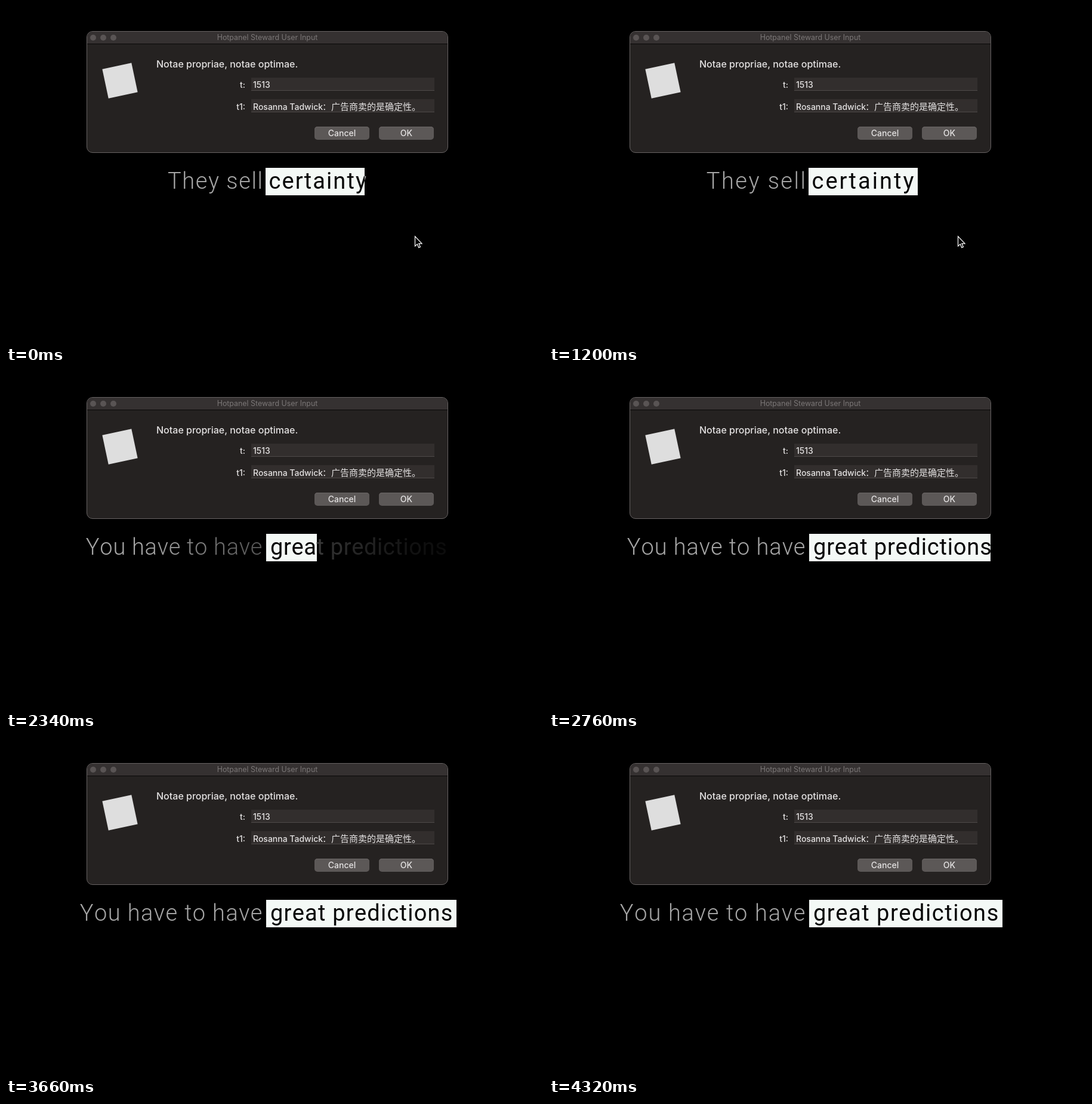
Recreate the animation shown at these times as an HTML page. Size 900 by 566 pixels, loop 4380 ms.

```html
<!DOCTYPE html>
<html lang="en">
<head>
<meta charset="utf-8">
<title>Caption over dialog</title>
<style>
  html, body { margin: 0; width: 100%; height: 100%; overflow: hidden; background: #000; }
  #stage { position: relative; width: 900px; height: 566px; overflow: hidden; background: #000; }
  #stage div { position: absolute; white-space: pre; }
  #dialog {
    left: 135px; top: 42px; width: 604px; height: 202px; overflow: hidden;
    border: 1px solid #676363; border-radius: 10px; background: #252221;
    font: 500 14px/20px Inter, "Noto Sans", sans-serif; color: #e4e2e2;
  }
  #bar {
    left: 0; top: 0; width: 100%; height: 20px; background: #353131;
    border-bottom: 1px solid #080707;
    font-size: 12.4px; font-weight: 400; line-height: 19px; text-align: center; color: #7b7777;
  }
  .dot { width: 10px; height: 10px; top: 5px; border-radius: 50%; background: #595454; }
  #mark { left: 30px; top: 57px; width: 50px; height: 50px; background: #dedede; transform: rotate(-12deg); }
  .field { left: 275px; width: 307px; height: 21px; background: #322e2d; border-bottom: 1px solid #4d4948; }
  .label { width: 60px; left: 205px; text-align: right; }
  .button {
    top: 159px; width: 92px; height: 22px; border-radius: 5px; background: #5c5857;
    box-shadow: inset 0 1px #6b6766; line-height: 22px; text-align: center;
  }
  #dialog .cjk { font: 15px/20px "Noto Sans CJK SC", "Noto Sans CJK", sans-serif; }
  .caption { font: 400 38px/46px Roboto, "Open Sans", sans-serif; font-kerning: none; color: #a6a6a6; }
  .lead { font-weight: 300; }
  #box { top: 271px; height: 46px; overflow: hidden; background: #f4f9f6; }
  #box .caption { top: -1px; color: #080808; }
  #lead, #tail { top: 270px; }
  svg { position: absolute; left: 680px; top: 380px; }
</style>
</head>
<body>
<div id="stage">
  <div id="dialog">
    <div id="bar">Hotpanel Steward User Input</div>
    <div class="dot" style="left:5px"></div>
    <div class="dot" style="left:22px"></div>
    <div class="dot" style="left:39px"></div>
    <div id="mark"></div>
    <div style="left:116px; top:44px; font-size:16px">Notae propriae, notae optimae.</div>
    <div class="field" style="top:77px"></div>
    <div class="field" style="top:113px"></div>
    <div class="label" style="top:79px">t:</div>
    <div class="label" style="top:116px">t1:</div>
    <div style="left:278px; top:79px">1513</div>
    <div style="left:278px; top:116px">Rosanna Tadwick</div>
    <div class="cjk" style="left:394px; top:115px">：广告商卖的是确定性。</div>
    <div class="button" style="left:381px">Cancel</div>
    <div class="button" style="left:489px">OK</div>
  </div>
  <div id="lead" class="caption lead"></div>
  <div id="tail" class="caption"></div>
  <div id="box"><div id="ink" class="caption"></div></div>
  <svg id="pointer" width="24" height="30" viewBox="0 0 24 30">
    <path d="M5.5 5.8V22.2L9.2 18.8L11.8 24.6L14.4 23.4L11.8 17.8H17Z" fill="#000" stroke="#fff" stroke-width="1.2"/>
  </svg>
</div>
<script>
const LOOP = 4380, STEP = 60, POINTER_HIDES = 1380;
const $ = id => document.getElementById(id);
const clamp = v => Math.min(1, Math.max(0, v));

// Linear interpolation through [time, value] points.
function along(points, t) {
  if (t <= points[0][0]) return points[0][1];
  for (let i = 1; i < points.length; i++) {
    const [t0, a] = points[i - 1], [t1, b] = points[i];
    if (t <= t1) return a + (b - a) * (t - t0) / (t1 - t0);
  }
  return points[points.length - 1][1];
}

const lines = [
  {
    from: 0, lead: "They sell", tail: "certainty",
    leadEnd: 430, tailStart: 440.5,
    leadGap: [[0, 1.55], [660, 2.2], [1740, 2.7]],
    tailGap: [[0, 2.1], [660, 2.65], [1740, 3.4], [1980, 3.5]],
    boxLeft: [[1800, 435], [1980, 623]],
    boxRight: [[0, 601], [60, 605], [120, 608], [240, 611], [660, 613], [1080, 617], [1740, 622], [1860, 623]],
    alpha: (i, t) => 1 - clamp((t - 1475 - i * 18) / 200)
  },
  {
    from: 1980, lead: "You have to have", tail: "great predictions",
    leadEnd: 429.5, tailStart: 443,
    leadGap: [[1980, 0.55], [2340, 0.73], [4320, 1.73]],
    tailGap: [[1980, 0.46], [2340, 0.62], [4320, 1.53]],
    boxLeft: [[0, 436]],
    boxRight: [[2160, 436], [2220, 446], [2280, 478], [2340, 521], [2400, 582], [2460, 640],
      [2520, 684], [2580, 712], [2640, 729], [2700, 739], [3240, 747.5], [3660, 755], [4320, 760]],
    alpha: (i, t) => clamp((t - 1950 - i * 9) / 350) ** 2
  }
];

function spell(el, text) {
  el.replaceChildren(...[...text].map(ch => {
    const s = document.createElement("span");
    s.textContent = ch;
    return s;
  }));
}

function fade(el, first, line, t) {
  [...el.children].forEach((s, i) => { s.style.opacity = line.alpha(first + i, t); });
}

let shown = null;

function draw(t) {
  const line = t < lines[1].from ? lines[0] : lines[1];
  if (line !== shown) {
    spell($("lead"), line.lead);
    spell($("tail"), line.tail);
    $("ink").textContent = line.tail;
    shown = line;
  }
  const leadGap = along(line.leadGap, t), tailGap = along(line.tailGap, t);
  const left = along(line.boxLeft, t), right = along(line.boxRight, t);

  $("lead").style.letterSpacing = leadGap + "px";
  $("lead").style.right = 900 - line.leadEnd - leadGap + "px";
  $("tail").style.letterSpacing = $("ink").style.letterSpacing = tailGap + "px";
  $("tail").style.left = line.tailStart + "px";
  $("ink").style.left = line.tailStart - left + "px";
  $("box").style.left = left + "px";
  $("box").style.width = Math.max(0, right - left) + "px";
  $("pointer").style.visibility = t < POINTER_HIDES ? "visible" : "hidden";

  fade($("lead"), 0, line, t);
  fade($("tail"), line.lead.length + 1, line, t);
}

const start = performance.now();
function tick() {
  const t = (performance.now() - start) % LOOP;
  draw(Math.floor(t / STEP) * STEP);
  requestAnimationFrame(tick);
}
tick();
</script>
</body>
</html>
```
